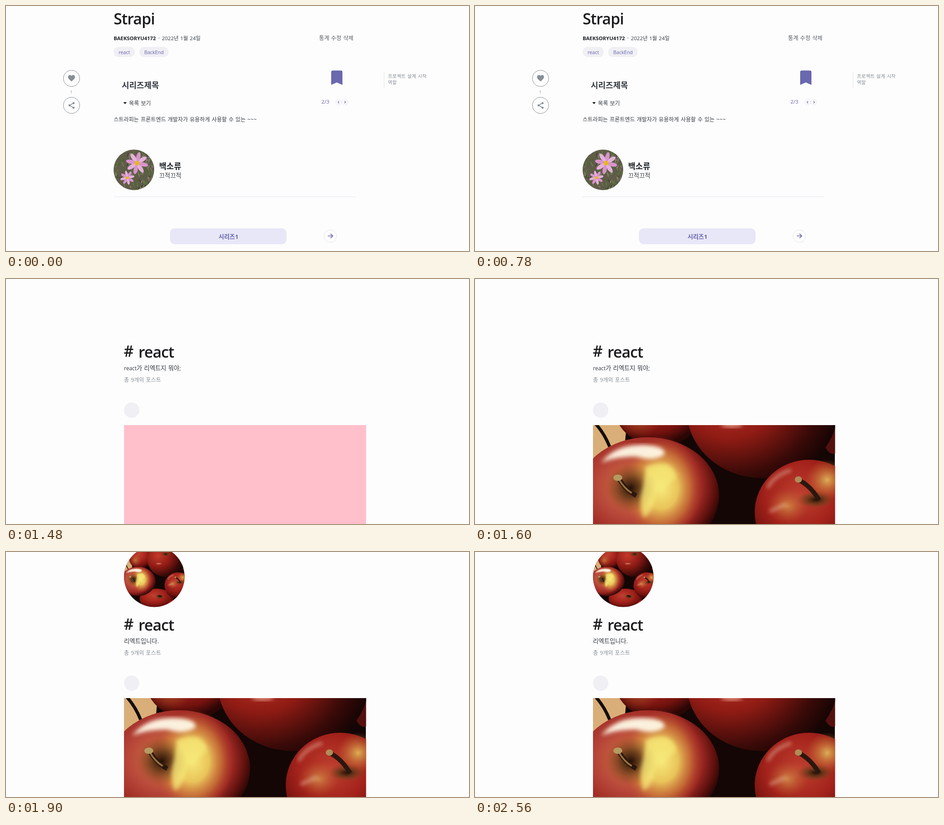
Animation, 1028 px wide and 545 px high, one loop 3000 ms. Source, as an HTML page:

```html
<!DOCTYPE html>
<html lang="ko">
<head>
<meta charset="utf-8">
<title>Blog</title>
<style>
  html, body { margin: 0; width: 100%; height: 100%; overflow: hidden; background: #fdfdfd; }
  svg { display: block; }
  text { font: 12.2px 'Open Sans', 'Noto Sans CJK KR', sans-serif; fill: #343a40; word-spacing: .8px; }
  .title { font-size: 34px; font-weight: 600; letter-spacing: -.9px; fill: #1b1c1f; }
  .bold { font-weight: 700; fill: #212529; }
  .grey { fill: #868e96; }
  .violet { fill: #6563aa; }
  .tag { font-size: 11px; letter-spacing: -.1px; }
  .aside { font-size: 10.7px; }
  .desc { font-size: 13.4px; }
  .line { fill: none; stroke: #e4e4f4; }
  .ring { fill: none; stroke: #868e96; }
  .chevron { fill: none; stroke: #6563aa; stroke-width: 1.2; }
  .soft { filter: url(#soft); }
  .stem { fill: none; stroke: #2c170d; stroke-width: 10; }
</style>
</head>
<body>
<svg width="1028" height="545" viewBox="0 0 1028 545">
  <defs>
    <radialGradient id="blush" cx=".42" cy=".42" r=".61">
      <stop offset="0" stop-color="#cf7a40"/>
      <stop offset=".45" stop-color="#b8483a"/>
      <stop offset=".75" stop-color="#9c2722"/>
      <stop offset=".9" stop-color="#5c100d"/>
      <stop offset="1" stop-color="#260605"/>
    </radialGradient>
    <radialGradient id="gold">
      <stop offset="0" stop-color="#f7ea7c"/>
      <stop offset=".4" stop-color="#eccb5c" stop-opacity=".95"/>
      <stop offset=".7" stop-color="#d58a3c" stop-opacity=".6"/>
      <stop offset="1" stop-color="#b8402c" stop-opacity="0"/>
    </radialGradient>
    <radialGradient id="red" cx=".42" cy=".34" r=".64">
      <stop offset="0" stop-color="#bf4030"/>
      <stop offset=".5" stop-color="#a3221b"/>
      <stop offset=".8" stop-color="#74120e"/>
      <stop offset="1" stop-color="#2a0605"/>
    </radialGradient>
    <radialGradient id="shade" cx=".28" cy=".38" r=".74">
      <stop offset="0" stop-color="#c43a2b"/>
      <stop offset=".45" stop-color="#8e1b14"/>
      <stop offset=".8" stop-color="#3a0a08"/>
      <stop offset="1" stop-color="#180504"/>
    </radialGradient>
    <radialGradient id="hollow">
      <stop offset="0" stop-color="#241006"/>
      <stop offset=".4" stop-color="#5d3517" stop-opacity=".85"/>
      <stop offset="1" stop-color="#8b4a20" stop-opacity="0"/>
    </radialGradient>
    <radialGradient id="glow">
      <stop offset="0" stop-color="#dcae55"/>
      <stop offset="1" stop-color="#c66a30" stop-opacity="0"/>
    </radialGradient>
    <filter id="soft"><feGaussianBlur stdDeviation="5"/></filter>

    <g id="apples">
      <path fill="#130605" d="M0-160h537v548H0z"/>
      <path fill="#d9ae78" d="M0-160h90L66 90H0z"/>

      <ellipse cx="147" cy="-54" rx="104" ry="102" fill="url(#red)"/>
      <ellipse cx="100" cy="-30" rx="55" ry="60" fill="url(#glow)" opacity=".55"/>
      <ellipse cx="534" cy="30" rx="22" ry="34" fill="#54100e"/>
      <ellipse cx="376" cy="-34" rx="168" ry="152" fill="url(#shade)"/>
      <ellipse cx="308" cy="0" rx="24" ry="6" fill="#e8a08c" opacity=".8" class="soft"/>
      <ellipse cx="370" cy="-85" rx="44" ry="24" fill="url(#hollow)"/>
      <path fill="none" stroke="#140d0a" stroke-width="7" d="M3-6Q24 16 37 48"/>

      <ellipse cx="288" cy="312" rx="150" ry="90" fill="url(#red)"/>
      <ellipse cx="470" cy="390" rx="96" ry="74" fill="url(#red)"/>
      <ellipse cx="318" cy="292" rx="44" ry="24" fill="url(#hollow)"/>
      <path class="stem" d="M300 284Q324 280 334 294"/>
      <path fill="#c39a63" d="M20 270l34 40-12 6-26-34z"/>

      <ellipse cx="122" cy="157" rx="158" ry="130" fill="url(#blush)"/>
      <ellipse cx="152" cy="140" rx="92" ry="115" fill="url(#gold)"/>
      <ellipse cx="84" cy="140" rx="56" ry="54" fill="url(#hollow)"/>
      <path fill="#f6e878" opacity=".75" class="soft" d="M118 92Q178 72 184 116 166 140 140 150 134 196 112 206 100 172 112 136z"/>
      <path fill="#fff9e6" opacity=".95" class="soft" d="M18 84Q50 42 112 44 164 46 158 66 134 82 96 70 48 70 18 84z"/>
      <path class="stem" d="M58 120Q72 144 96 157"/>
      <path fill="none" stroke="#94703f" stroke-width="4" d="M57 120Q70 142 86 151"/>
      <ellipse cx="55" cy="117" rx="10" ry="7" fill="#b59a62"/>

      <ellipse cx="480" cy="194" rx="121" ry="117" fill="url(#red)"/>
      <ellipse cx="520" cy="122" rx="48" ry="46" fill="url(#glow)"/>
      <ellipse cx="432" cy="180" rx="46" ry="40" fill="url(#glow)" opacity=".65"/>
      <ellipse cx="494" cy="166" rx="42" ry="20" fill="url(#hollow)"/>
      <path fill="none" stroke="#f3cdb4" stroke-width="5" opacity=".7" class="soft" d="M388 140Q400 112 440 100M392 192l36-16"/>
      <path class="stem" d="M457 122Q484 136 502 167"/>
      <ellipse cx="456" cy="121" rx="8" ry="7" fill="#b08c58"/>
    </g>
    <g id="flower"><circle r="5" fill="#e9b90f"/></g>
    <clipPath id="profileClip"><circle cx="284" cy="364.5" r="45"/></clipPath>
    <clipPath id="avatarClip"><circle cx="329.3" cy="55" r="67.2"/></clipPath>
    <clipPath id="coverClip"><path d="M262 325h537.5v220H262z"/></clipPath>
  </defs>

  <g data-to="1300">
    <text class="title" x="239" y="41">Strapi</text>
    <text class="bold" x="239" y="76" style="font-size:11.4px">BAEKSORYU4172</text>
    <text x="338" y="75.5">·</text>
    <text x="346" y="76" style="font-size:11.6px">2022년 1월 24일</text>
    <text x="695" y="76" style="font-size:12.4px;fill:#565c63">통계 수정 삭제</text>
    <rect x="239" y="91" width="47" height="22.5" rx="11.2" fill="#f0eff4"/>
    <rect x="296" y="91" width="65" height="22.5" rx="11.2" fill="#f0eff4"/>
    <text class="tag violet" x="250" y="106.5">react</text>
    <text class="tag violet" x="307" y="106.5">BackEnd</text>

    <circle class="ring" cx="145.5" cy="161" r="18"/>
    <path class="grey" transform="translate(136.5 151.8) scale(.75)" d="M12 21.4C5 15.2 2 12.3 2 8.5A5.4 5.4 0 0 1 12 5.1 5.4 5.4 0 0 1 22 8.5C22 12.3 19 15.2 12 21.4z"/>
    <text class="grey" x="145" y="194.5" text-anchor="middle" style="font-size:8.5px">1</text>
    <circle class="ring" cx="145.5" cy="221" r="18"/>
    <path class="ring" stroke-width="1.5" d="M150 216l-9 5 9 5.3"/>
    <g class="grey">
      <circle cx="150" cy="216" r="2.3"/><circle cx="141" cy="221" r="2.3"/><circle cx="150" cy="226.3" r="2.3"/>
    </g>

    <text class="bold" x="257" y="183" style="font-size:18px;fill:#343a40">시리즈제목</text>
    <path d="M260.5 214h7.5l-3.75 4z"/>
    <text x="273" y="220.5">목록 보기</text>
    <path fill="#6a68ae" d="M722 175.5V147q0-3.5 3.5-3.5h18q3.5 0 3.5 3.5v28.5l-12.5-5.5z"/>
    <text class="violet" x="700.5" y="217" style="font-size:11.5px">2/3</text>
    <circle class="line" cx="738.5" cy="214" r="6.5"/>
    <circle class="line" cx="752.5" cy="214" r="6.5"/>
    <path class="chevron" d="M739.5 211.5l-2.5 2.5 2.5 2.5M751.5 211.5l2.5 2.5-2.5 2.5"/>
    <text x="239" y="256.5">스트라피는 프론트엔드 개발자가 유용하게 사용할 수 있는 ~~~</text>

    <path class="line" d="M839.5 146v38" style="stroke:#dfe1ea"/>
    <text class="aside grey" x="848" y="160">프로젝트 설계 시작</text>
    <text class="aside grey" x="848" y="173.5">역할</text>

    <g clip-path="url(#profileClip)">
      <path fill="#5f5c48" d="M239 319h90v91h-90z"/>
      <g id="grass" fill="none" stroke-width="2"></g>
      <use href="#flower" transform="translate(291 349.5)"/>
      <use href="#flower" transform="translate(269.5 382) rotate(20) scale(.64)"/>
    </g>
    <text class="bold" x="340" y="363" style="font-size:17.8px">백소류</text>
    <text class="desc" x="340" y="381.5">끄적끄적</text>
    <path class="line" d="M239 424.5h537"/>

    <rect x="364" y="494.5" width="259" height="35.5" rx="11" fill="#e8e7f8"/>
    <text class="bold" x="494" y="517.5" text-anchor="middle" style="font-size:13.2px;fill:#6563aa">시리즈1</text>
    <circle class="line" cx="720" cy="512" r="14"/>
    <path class="chevron" style="stroke-width:1.7" d="M714.5 511.5h11M720.5 506.5l5 5-5 5"/>
  </g>

  <g data-from="1300">
    <text class="title" x="261.5" y="173">#</text>
    <text class="title" x="294" y="175">react</text>
    <text class="desc" data-to="1900" x="262" y="203"><tspan style="font-size:12px">react</tspan>가 리엑트지 뭐야;</text>
    <text class="desc" data-from="1900" x="262" y="203">리엑트입니다.</text>
    <text class="grey" x="262" y="229">총 9개의 포스트</text>
    <circle cx="279" cy="291.7" r="17" fill="#f0eff4"/>
    <path data-to="1600" fill="#ffc0cb" d="M262 325h537.5v220H262z"/>
    <g data-from="1600" clip-path="url(#coverClip)">
      <use href="#apples" transform="translate(262 325)"/>
    </g>
    <g data-from="1700" clip-path="url(#avatarClip)">
      <use href="#apples" transform="translate(262 26) scale(.2505)"/>
    </g>
  </g>
</svg>
<script>
  const LOOP = 3000;

  function add(parent, tag, attrs) {
    const node = document.createElementNS('http://www.w3.org/2000/svg', tag);
    for (const key in attrs) node.setAttribute(key, attrs[key]);
    parent.prepend(node);
  }

  let seed = 7;
  const random = () => (seed = seed * 16807 % 2147483647) / 2147483647;

  const grass = document.getElementById('grass');
  const greens = ['#3f4430', '#77775c', '#4c6334', '#8b8473', '#5c7a3b'];
  for (let i = 0; i < 150; i++) {
    const x = 239 + 90 * random(), y = 319 + 90 * random();
    const dx = 10 * random() - 5, dy = 3 + 7 * random();
    add(grass, 'path', { d: `M${x} ${y}l${dx} ${dy}`, stroke: greens[i % greens.length] });
  }

  const flower = document.getElementById('flower');
  for (let i = 0; i < 8; i++) {
    add(flower, 'ellipse', {
      cx: 14, rx: 11, ry: 4.6, transform: `rotate(${i * 45 + 12})`,
      fill: i % 2 ? '#e5b0da' : '#d894cb'
    });
  }

  const timed = document.querySelectorAll('[data-from], [data-to]');
  function draw(now) {
    const t = now % LOOP;
    for (const node of timed) {
      const { from = 0, to = LOOP } = node.dataset;
      node.style.display = t >= from && t < to ? '' : 'none';
    }
  }

  const start = performance.now();
  function tick() {
    draw(performance.now() - start);
    requestAnimationFrame(tick);
  }
  tick();
</script>
</body>
</html>
```
